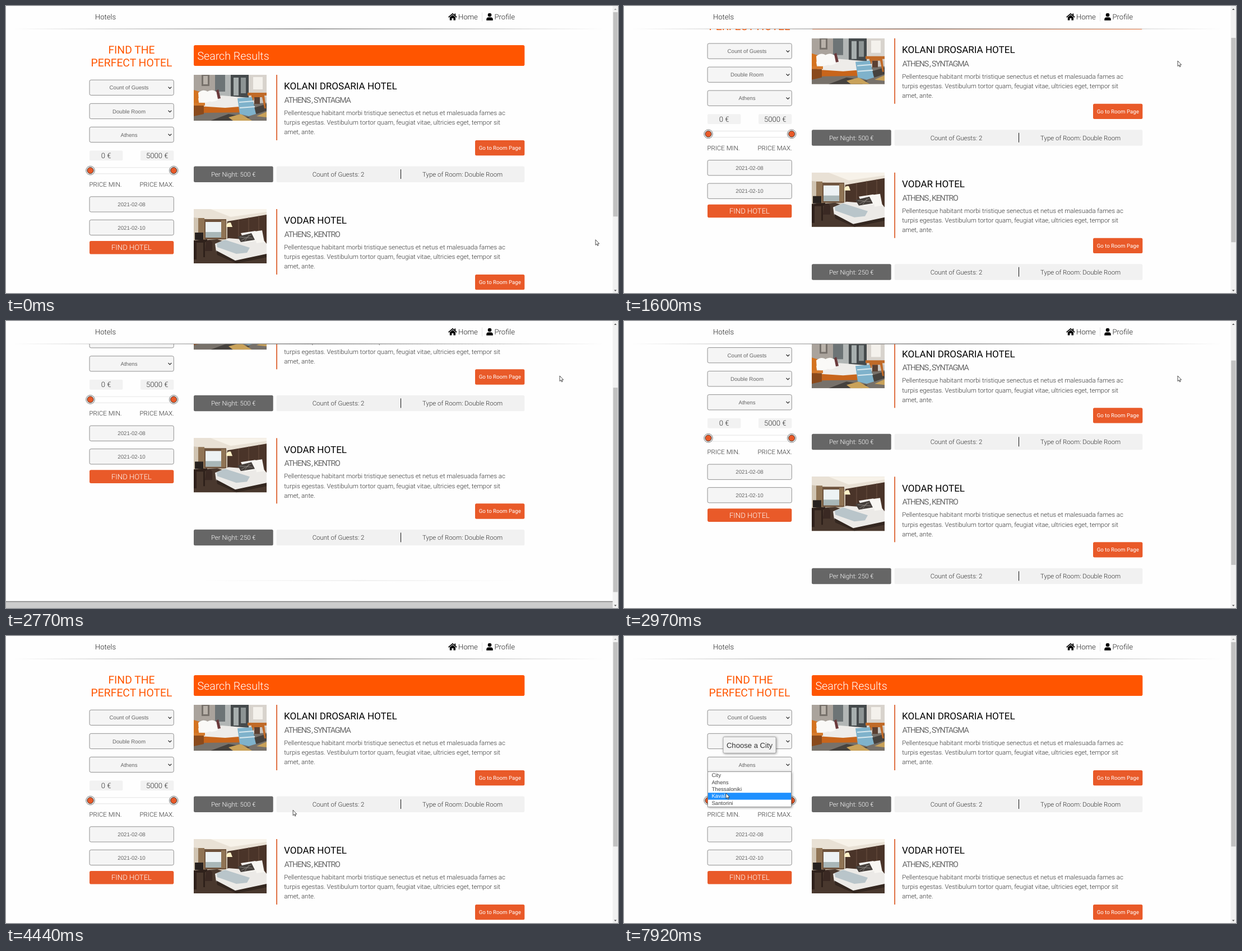
An HTML page for the animation above (7990 ms loop, 1092x513 px).

```html
<!DOCTYPE html>
<html lang="en">
<head>
<meta charset="utf-8">
<title>Hotels</title>
<style>
  html, body { margin: 0; width: 100%; height: 100%; overflow: hidden; background: #fefefe; }
  svg { display: block; width: 100vw; height: 100vh; }
  text { font-family: Roboto, sans-serif; font-weight: 300; text-rendering: geometricPrecision; }
  .regular { font-weight: 400; }
  .ui { font-family: "Liberation Sans", Arial, sans-serif; font-weight: 400; }
  .shadow { filter: drop-shadow(1px 1px 2px #0006); }
</style>
</head>
<body>
<svg id="stage" viewBox="0 0 1092 513"></svg>
<script>
const LOOP = 7990, OPEN_AT = 7250, ROW_TOP = 243, ROW = 12.4;
const ORANGE = '#ff5500', RUST = '#e95a29', INK = '#333', BODY = 11.43;

// Text is placed by the middle of its capitals.
const text = (s, x, mid, size, fill = INK, anchor = 'start', extra = '') =>
  `<text x="${x}" y="${mid + 0.356 * size}" font-size="${size}" fill="${fill}" text-anchor="${anchor}" ${extra}>${s}</text>`;
const rect = (x, y, w, h, fill, r = 0, extra = '') =>
  `<rect x="${x}" y="${y}" width="${w}" height="${h}" rx="${r}" fill="${fill}" ${extra}/>`;
const path = (d, fill, extra = '') => `<path d="${d}" fill="${fill}" ${extra}/>`;
const line = (d, color, w = 1, extra = '') => path(d, 'none', `stroke="${color}" stroke-width="${w}" ${extra}`);
const fade = (id, color) => `<linearGradient id="${id}"><stop stop-color="${color}" stop-opacity="0"/>
  <stop offset=".5" stop-color="${color}"/><stop offset="1" stop-color="${color}" stop-opacity="0"/></linearGradient>`;

const field = (label, y, x) =>
  rect(149, y, 150.3, 27.3, '#f5f5f5', 2.8, 'stroke="#858585" stroke-width=".9"') +
  text(label, x, y + 13.8, 9.67, '#666', 'middle', 'class="ui"');
const select = (label, y) => field(label, y, 219.5) +
  line(`M289.5 ${y + 12.4}l2.9 2.9l2.9-2.9`, INK, 1.3);
const price = (label, x) =>
  rect(x, 258.5, 59.3, 17.8, '#f2f2f2', 2) + text(label, x + 29.7, 267.2, 13.08, INK, 'middle');
const knob = x => `<circle cx="${x}" cy="294" r="7.8" fill="#fff" stroke="#666" stroke-width=".9"/>
  <circle cx="${x}" cy="294" r="5.6" fill="${RUST}" stroke="#333" stroke-width="1"/>`;

const sidebar = () =>
  text('FIND THE', 224, 78, 19.34, ORANGE, 'middle', 'class="regular"') +
  text('PERFECT HOTEL', 224, 101, 19.34, ORANGE, 'middle', 'class="regular"') +
  select('Count of Guests', 132.2) + select('Double Room', 174.3) + select('Athens', 216.3) +
  price('0 €', 149) + price('5000 €', 240) +
  rect(150, 288.8, 150, 11, '#fff', 2, 'stroke="#ddd" stroke-width=".8"') +
  knob(150.5) + knob(299.2) +
  text('PRICE MIN.', 148.4, 319, 11.5) + text('PRICE MAX.', 299.8, 319, 11.5, INK, 'end') +
  field('2021-02-08', 340.8, 224) + field('2021-02-10', 382.3, 224) +
  rect(149, 420, 150.3, 23.6, RUST, 2.8) + text('FIND HOTEL', 224, 431.6, 13.1, '#fff', 'middle');

// Bedroom pictures, drawn from their own top left corner.
const orangeRoom = () =>
  rect(0, 0, 130, 82, '#c9c4be') +
  rect(0, 0, 38, 40, '#aaa39c') + rect(14, 0, 14, 20, '#77716b') + rect(17, 2, 8, 15, '#b9b2aa') +
  rect(38, 0, 60, 38, '#b2b6b5') + rect(38, 0, 18, 30, '#6d7476') + rect(66, 0, 32, 42, '#454a4c') +
  rect(71, 5, 9, 32, '#a7aeae') + rect(84, 5, 9, 28, '#8d9494') +
  rect(98, 0, 32, 40, '#d8d3cd') + rect(106, 4, 17, 22, '#f4f1ec') +
  path('M0 62L40 56L130 50V82H0Z', '#77716a') +
  path('M30 82L62 70L100 76L90 82ZM104 60L130 52V64L112 70Z', '#46423e') +
  path('M62 76L84 70L104 82H70ZM112 74L130 66V76Z', '#c9a25a') +
  path('M0 27L10 30V60L0 64Z', '#d4721f') +
  path('M96 32H130V37H126L129 60H126L122 40H108L104 58H101L103 37H96Z', '#c06a28') +
  path('M108 40h10v12h-10z', '#5b4032') +
  path('M8 52L106 53V63L100 67L14 68Z', '#c8651b') +
  path('M8 42L50 37L98 41L106 55L56 59L10 56Z', '#eeece9') +
  path('M8 32Q18 24 26 31L28 48Q16 52 9 47ZM24 30Q34 24 42 32L43 45Q34 50 27 47Z', '#faf9f7') +
  path('M40 28l4-2l4 16l-5 1z', '#6b3a3c') +
  path('M78 42L104 40L111 70L98 74L82 70Z', '#7fb2cb') + line('M81 49L107 47M82 59L109 57', '#d9e8ee', 2) +
  rect(0, 50, 20, 5, '#d57a2c') + path('M0 55H18V70L0 74Z', '#8a4a1c');
const brownRoom = () =>
  rect(0, 0, 130, 97, '#cfc3b1') +
  path('M0 0H130V14L76 24L0 15Z', '#e9e1d5') + path('M30 0H130V5L66 14Z', '#f7f2e9') +
  path('M60 22L130 10V62H60Z', '#4a3429') + line('M80 19V55M98 15V55M116 12V58', '#6b5143', 1) +
  rect(14, 18, 44, 36, '#6e533d') + rect(21, 23, 28, 28, '#edf2f4') + rect(21, 41, 28, 10, '#a9b7b8') +
  path('M8 16H19V58H8ZM49 20H57V52H49Z', '#907455') +
  path('M58 28l4-4h4l3 8h-11z', '#fff1c8') +
  path('M0 57L42 54L60 60L130 74V97H0Z', '#49382e') +
  path('M0 56L24 54V59H20V86H17V60H5V90H0Z', '#2f211b') + rect(2, 42, 15, 13, '#27211e') +
  path('M22 58q8-6 11 2v15h-13z', '#3a2923') +
  path('M38 62L62 52L126 57L130 62V82L74 94L40 76Z', '#eceae7') +
  path('M40 74L74 92L130 80V86L76 97L42 82Z', '#342720') +
  path('M41 61L56 55L100 69L95 78L76 80L42 68Z', '#b9c5ca') +
  path('M84 43L110 39L116 56L92 60ZM108 40L122 38L126 59L112 61Z', '#f8f6f2') +
  path('M78 49L103 43L109 55L84 59Z', '#453f3b') +
  line('M82 50L105 52M85 56L103 46M91 57L99 46', '#96908a', 0.8);

const lorem = ['Pellentesque habitant morbi tristique senectus et netus et malesuada fames ac',
  'turpis egestas. Vestibulum tortor quam, feugiat vitae, ultricies eget, tempor sit', 'amet, ante.'];
const card = (y, name, area, cost, photo, h) => `<g transform="translate(0 ${y})">
  <svg x="335" y="0" width="130" height="${h}">${photo()}</svg>` +
  rect(482.2, 0, 1.8, 117, '#dc6230') +
  text(name, 496, 20.2, 17.06, '#000', 'start', 'class="regular"') +
  text('ATHENS , ' + area, 496.6, 45, 14.22, '#666', 'start', 'class="regular" letter-spacing="-1.24"') +
  lorem.map((s, i) => text(s, 496.2, 68 + 17.2 * i, BODY)).join('') +
  rect(837, 117, 88.3, 27.3, RUST, 2.5) + text('Go to Room Page', 881.2, 130.4, 9.67, '#fff', 'middle', 'class="regular"') +
  rect(335, 163.5, 141.7, 28.4, '#666', 2.5) + text(`Per Night: ${cost} €`, 405.8, 177.8, BODY, '#fff', 'middle') +
  rect(482.6, 163.5, 442.6, 28.4, '#f1f1f1', 2.5) + rect(704, 169, 1, 17, '#111') +
  text('Count of Guests: 2', 593, 177.8, BODY, INK, 'middle') +
  text('Type of Room: Double Room', 814.7, 177.8, BODY, INK, 'middle') + '</g>';

const cities = ['City', 'Athens', 'Thessaloniki', 'Kavala', 'Santorini'];
const popup = () => '<g id="popup">' +
  rect(177, 180.3, 94, 29, '#f3f3f3', 2, 'stroke="#999" stroke-width=".8" class="shadow"') +
  text('Choose a City', 224, 195, 13.08, INK, 'middle', 'class="ui"') +
  rect(149.6, 242.7, 148.8, 62.8, '#fff', 0, 'stroke="#777" stroke-width=".7" class="shadow"') +
  rect(150, ROW_TOP, 148, ROW, '#1e90ff', 0, 'id="mark"') +
  cities.map((s, i) => text(s, 156.4, ROW_TOP + ROW * (i + 0.46), 9.67, '#444', 'start', 'class="ui city"')).join('') +
  '</g>';

const header = () => rect(0, 0, 1083, 41, '#fefefe') + rect(12, 40.2, 1054, 1.4, 'url(#rule)') +
  text('Hotels', 159, 19.7, 13.08, '#222') +
  line('M789.6 20.2L796.9 13.9L804.2 20.2', '#000', 1.6) +
  path('M791.8 20.3L796.9 16L802 20.3V25.6H798.4V21.8H795.4V25.6H791.8ZM800.3 13.6H802.2V17.6L800.3 16Z', '#000') +
  text('Home', 806.9, 19.7, 13.08, '#222') +
  line('M849.5 12V28', '#bbb', 0.8, 'stroke-dasharray="1 1"') +
  '<circle cx="863" cy="16" r="3.3"/>' +
  path('M857.2 25.8V24Q857.2 20.2 861 20.2H865Q868.8 20.2 868.8 24V25.8Z', '#000') +
  text('Profile', 871.5, 19.7, 13.08, '#222');

const scrollbar = () => rect(1082.5, 0, 9.5, 513, '#f1f1f1') +
  '<path id="up" d="M1085 7L1087.3 4.5L1089.6 7Z"/>' + path('M1085 507.5L1087.3 510L1089.6 507.5Z', '#505050') +
  rect(1083.4, 11, 8, 365.3, '#c1c1c1', 0, 'id="thumb"');

const $ = id => document.getElementById(id);
$('stage').innerHTML = `<defs>${fade('rule', '#777')}${fade('soft', '#ddd')}</defs>
  ${rect(0, 0, 1092, 513, '#fefefe')}
  <g id="page">` + sidebar() +
  rect(335, 70, 590.3, 37, ORANGE, 2.8) + text('Search Results', 341.4, 89, 19.6, '#fff') +
  card(123, 'KOLANI DROSARIA HOTEL', 'SYNTAGMA', 500, orangeRoom, 82) +
  card(363, 'VODAR HOTEL', 'KENTRO', 250, brownRoom, 97.4) +
  rect(345, 617.2, 570, 0.9, 'url(#soft)') +
  rect(0, 655, 1083, 40, '#ccc') + rect(0, 654.4, 1083, 1.5, '#808080') + popup() + '</g>' +
  header() + scrollbar() +
  path('M0 0V9.6L2.2 7.6L3.6 10.8L5 10.2L3.7 7.1H6.6Z', '#fff', 'id="cursor" stroke="#222" stroke-width=".8"');

// Keys: time, then values, joined by straight lines.
const scrollKeys = [[1110, 0], [1170, 9], [1240, 37], [1300, 53], [1350, 57], [1540, 57], [1600, 65],
  [1780, 110], [1910, 148], [2040, 173], [2110, 178], [2710, 178], [2770, 154], [3160, 19.5], [3230, 5], [3300, 0]];
const cursorKeys = [[0, 1052, 418], [200, 1042, 368], [400, 1014, 220], [560, 993, 118], [670, 988, 98],
  [3530, 988, 98], [3800, 920, 140], [4100, 790, 235], [4330, 666, 290], [4440, 513, 311],
  [4650, 330, 355], [4850, 255, 384], [5160, 230, 396], [5230, 230, 394], [5600, 234, 310], [6000, 240, 229],
  [6070, 246, 224], [6400, 283, 182], [6650, 225, 152], [6850, 180, 142], [6920, 184, 148],
  [7200, 214, 230], [7330, 214, 234], [7660, 187, 258], [7730, 186, 261], [7920, 182, 281]];

function at(keys, t) {
  const n = keys.findIndex(k => k[0] > t);
  if (n === 0) return keys[0].slice(1);
  if (n < 0) return keys[keys.length - 1].slice(1);
  const a = keys[n - 1], b = keys[n], p = (t - a[0]) / (b[0] - a[0]);
  return a.slice(1).map((v, i) => v + (b[i + 1] - v) * p);
}

function draw(t) {
  const [scroll] = at(scrollKeys, t), [x, y] = at(cursorKeys, t);
  $('page').setAttribute('transform', `translate(0 ${-scroll})`);
  $('thumb').setAttribute('y', 11 + scroll * 0.704);
  $('up').setAttribute('fill', scroll > 0 ? '#505050' : '#a3a3a3');
  $('cursor').setAttribute('transform', `translate(${x} ${y})`);
  $('popup').style.display = t < OPEN_AT ? 'none' : '';
  const row = Math.max(1, Math.floor((y - ROW_TOP) / ROW));
  $('mark').setAttribute('y', ROW_TOP + ROW * row);
  document.querySelectorAll('.city').forEach((el, i) => el.setAttribute('fill', i === row ? '#fff' : '#444'));
}

const start = performance.now();
function tick() {
  draw((performance.now() - start) % LOOP);
  requestAnimationFrame(tick);
}
tick();
</script>
</body>
</html>
```
